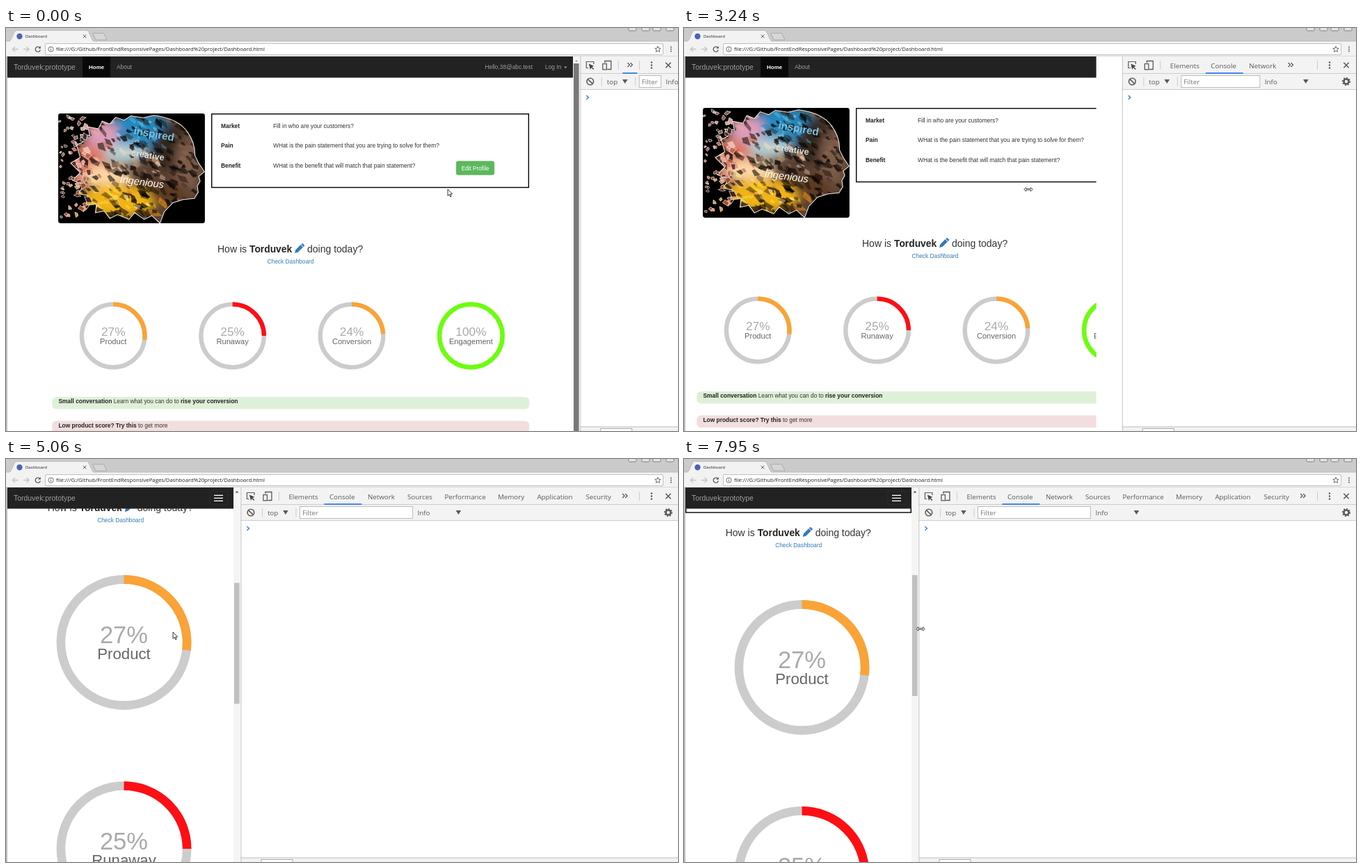
Recreate the animation shown at these times as an HTML page. Size 966 px wide and 580 px high, loop 8 s.

```html
<!DOCTYPE html>
<html lang="en">
<head>
<meta charset="utf-8">
<title>Responsive dashboard</title>
<style>
  html, body { margin: 0; width: 100%; height: 100%; overflow: hidden; background: #fff; }
  svg { display: block; }
  text { font-family: "Liberation Sans", Arial, sans-serif; font-size: 8.38px; fill: #333; white-space: pre; }
  .ui text { font-family: "Open Sans", "Noto Sans", sans-serif; font-size: 9.8px; fill: #5a5a5a; }
  .b { font-weight: 700; fill: #222; }
  .mid { text-anchor: middle; }
  .link { fill: #337ab7; }
  .line { fill: none; stroke: #5a5a5a; stroke-width: 1.3; }
  .sep { stroke: #ccc; }
</style>
</head>
<body>
<svg id="stage" width="966" height="580" viewBox="0 0 966 580"></svg>
<script>
const BRAND = 'Torduvek';
const LOOP = 8000;

// ---------- markup helpers ----------
const text = (x, y, s, attrs = '') => `<text x="${x}" y="${y}" ${attrs}>${s}</text>`;
const bold = (x, y, s) => text(x, y, s, 'class="b"');
const size = px => `style="font-size:${px}px"`;
const rect = (x, y, w, h, fill, attrs = '') =>
  `<rect x="${x}" y="${y}" width="${w}" height="${h}" fill="${fill}" ${attrs}/>`;
const path = (d, attrs) => `<path d="${d}" ${attrs}/>`;
const group = (x, y, body, attrs = '') => `<g transform="translate(${x} ${y})" ${attrs}>${body}</g>`;
const down = (x, y) => path(`M${x - 3.8} ${y - 3}h7.6l-3.8 6z`, 'fill="#5a5a5a"');
const dots = (x, y, r, gap) =>
  [-gap, 0, gap].map(d => `<circle cx="${x}" cy="${y + d}" r="${r}" fill="#555"/>`).join('');

// ---------- picture: a dissolving head in flat tones ----------
let seed = 11;
const rnd = () => (seed = (seed * 16807) % 2147483647) / 2147483647;
const pick = list => list[Math.floor(rnd() * list.length)];

// an irregular four-cornered splinter, stretched along its tilt
function shard(x, y, r, stretch, tilt, attrs) {
  const turn = rnd() * 6.28;
  const pts = [0, 1.3, 2.9, 4.4].map(d => {
    const k = r * (0.6 + rnd() * 0.8), a = turn + d;
    return `${(k * stretch * Math.cos(a)).toFixed(1)},${(k * Math.sin(a)).toFixed(1)}`;
  });
  return `<polygon points="${pts.join(' ')}" transform="translate(${x.toFixed(1)} ${y.toFixed(1)}) rotate(${tilt.toFixed()})" ${attrs}/>`;
}

function picture() {
  const head = 'M38 66L52 60 46 44 66 46 62 28 84 32 92 16 108 22 120 8 138 14 152 5 178 9 200 4Q250 10 270 38 287 62 286 88' +
    'L294 104 306 122 294 132 297 142 291 152 293 165 285 178 262 180 240 187 222 206 213 230' +
    ' 196 214 180 222 160 208 148 222 124 212 108 220 96 204 78 208 80 190 58 192 62 172 42 168 54 150 30 140 46 124 26 104 46 92Z';
  const glow = (x, y, rx, ry, c) => `<ellipse cx="${x}" cy="${y}" rx="${rx}" ry="${ry}" fill="${c}"/>`;
  let inside = '', loose = '';
  for (let i = 0; i < 330; i++) {
    const x = 30 + rnd() * 265, y = 5 + rnd() * 218;
    const light = y > 135 ? ['#ffd21e', '#ffe48a', '#e08a1c'] : x < 105 ? ['#f0a596', '#f6d4cc', '#d2604c'] : y < 80 ? ['#4fb3de', '#a9d8ea', '#2c7fae'] : ['#e8d9c4', '#c99c70', '#8c6a55'];
    const dark = rnd() < 0.4 + x / 600;
    const tone = dark ? pick(['#000', '#0d0907', '#2a1710']) : pick(x > 225 ? ['#8a6450', '#5d4436', '#3a2a24'] : light);
    inside += shard(x, y, 2.5 + rnd() * 4.5, 2, 35 + rnd() * 40 - 20, `fill="${tone}" opacity="${(0.35 + rnd() * 0.45).toFixed(2)}"`);
  }
  for (let i = 0; i < 62; i++) {
    const x = 3 + rnd() * 62, y = 6 + rnd() * 218;
    const tone = pick(y < 70 ? ['#8d5a4c', '#d3a3a4', '#3a2620'] : y < 150 ? ['#c9634c', '#e0a090', '#7b3427'] : ['#a5482c', '#d89a3c', '#452016']);
    loose += shard(x, y, 2 + x / 65 * 4, 1.3, rnd() * 180, `fill="${tone}" stroke="#f4e6df" stroke-width="1"`);
  }
  const word = (x, y, turn, px, fill, s, extra = '') =>
    `<text transform="translate(${x} ${y}) rotate(${turn})" style="font-size:${px}px;fill:${fill};${extra}">${s}</text>`;
  return `<clipPath id="headClip">${path(head, '')}</clipPath>
    <filter id="soft" x="-40%" y="-40%" width="180%" height="180%"><feGaussianBlur stdDeviation="10"/></filter>
    <clipPath id="frame"><rect width="307" height="230" rx="5"/></clipPath>
    <symbol id="art" viewBox="0 0 307 230"><g clip-path="url(#frame)">
      ${rect(0, 0, 307, 230, '#000')}
      <g clip-path="url(#headClip)">${rect(0, 0, 307, 230, '#5a4032')}
        <g filter="url(#soft)">
          ${glow(170, 38, 72, 40, '#2389c0')}${glow(92, 46, 36, 30, '#dd9dbb')}
          ${glow(62, 108, 44, 44, '#dc7a66')}${glow(140, 84, 44, 22, '#b4cdd2')}
          ${glow(100, 130, 52, 22, '#fbd8a6')}${glow(125, 182, 80, 36, '#f0b414')}
          ${glow(235, 70, 38, 48, '#33261f')}${glow(270, 110, 26, 60, '#7d5c4a')}${glow(230, 165, 42, 24, '#5b3a20')}
        </g>${inside}</g>
      ${path(head, 'fill="none" stroke="#f6ece4" stroke-width="1.5"')}${loose}
      ${word(157, 43, 10, 22, '#79c2e2', 'inspired', 'font-weight:700')}
      ${word(152, 88, 9, 18.5, '#d6dedf', 'creative', 'font-weight:700')}
      ${word(129, 145, 7, 21.5, '#fff', 'ingenious', 'font-style:italic')}
      ${word(72, 190, -2, 9, '#ffe066', 'powerful')}
    </g></symbol>`;
}
const art = (x, y, w, h) => `<use href="#art" x="${x}" y="${y}" width="${w}" height="${h}"/>`;

// ---------- page pieces ----------
const METERS = [['Product', 27, '#faa336'], ['Runaway', 25, '#ff0e14'], ['Conversion', 24, '#faa336'], ['Engagement', 100, '#6bff0b']];
const PROFILE = [
  ['Market', 'Fill in who are your customers?'],
  ['Pain', 'WHat is the pain statement that you are trying to solve for them?'],
  ['Benefit', 'WHat is the benefit that will match that pain statement?']
];

function meter([label, pct, color], x, y, scale) {
  const ring = (c, more = '') => `<circle r="45.3" fill="none" stroke="${c}" stroke-width="6.3" ${more}/>`;
  return `<g transform="translate(${x} ${y}) scale(${scale})">${ring('#ccc')}
    ${ring(color, `pathLength="100" stroke-dasharray="${pct} ${pct < 100 ? 100 : 0}" transform="rotate(-90)"`)}
    ${text(0, 0.4, pct + '%', 'class="mid" style="font-size:17.3px;fill:#aaa"')}
    ${text(0, 12.2, label, 'class="mid" style="font-size:11.1px;fill:#666"')}</g>`;
}

const button = (x, y) => rect(x + .3, y + .3, 54.5, 19.5, '#5cb85c', 'rx="2.5" stroke="#4cae4c" stroke-width=".6"') +
  text(x + 27.5, y + 13, 'Edit Profile', 'class="mid" style="font-size:8.2px;fill:#fff"');

const heading = text(304, 323, 'How is', size(14)) +
  text(350, 323, BRAND, `class="b" ${size(13.8)}`) +
  group(415, 310, path('M0 14l1.2-4.6 7.3-7.3 3.4 3.4-7.3 7.3zM9.3 1.5l1.2-1.2q.6-.5 1.2 0l2.2 2.2q.5.6 0 1.2l-1.2 1.2z', 'class="link"')) +
  text(433, 323, 'doing today?', size(14)) +
  text(409, 339, 'Check Dashboard', 'class="mid link"');

const banner = (x, y, w, fill, body) => rect(x, y, w, 17.5, fill, 'rx="6"') + text(x + 9.2, y + 9, body);
const strong = s => `<tspan class="b">${s}</tspan>`;
const banners = (x, y, w) =>
  banner(x, y, w, '#dff0d8', `${strong('Small conversation')} Learn what you can do to ${strong('rise your conversion')}`) +
  banner(x, y + 34.5, w, '#f2dede', `${strong('Low product score? Try this')} to get more`);

const desktop = art(75, 123, 211, 158) +
  rect(295.7, 123.7, 455.6, 105.8, 'none', 'stroke="#000" stroke-width="1.4"') +
  PROFILE.map(([k, v], i) => bold(309, 143.5 + i * 28.5, k) + text(384, 143.5 + i * 28.5, v)).join('') +
  button(647, 191.5) + heading +
  METERS.map((m, i) => meter(m, 154.2 + i * 171.4, 443, 1)).join('') +
  banners(66.3, 531, 686);

const mobile = art(11, 75, 307, 230) +
  PROFILE.map(([k, v], i) => bold(10, 322 + i * 37, k) + text(10, 334 + i * 37, v)).join('') +
  button(10, 416.5) + group(-244.3, 159, heading) +
  METERS.map((m, i) => meter(m, 169.5, 671 + i * 297, 2)).join('') +
  banners(3, 1719, 323);

const nav = rect(2, 41, 964, 30.5, '#222') +
  text(11, 60, BRAND + ':prototype', 'style="font-size:10.45px;fill:#9d9d9d"') +
  `<g id="wideNav">${rect(110, 41, 40, 30, '#080808')}
    ${text(119, 59, 'Home', 'style="font-size:8px;font-weight:700;fill:#fff"')}
    ${text(159, 59, 'About', 'style="fill:#9d9d9d"')}
    <g id="account">${text(757, 59, 'Hello,38@abc.test', 'text-anchor="end" style="fill:#9d9d9d"')}
    ${text(775, 59, 'Log In', 'style="fill:#9d9d9d"')}${path('M802 55.5h4.6l-2.3 2.4z', 'fill="#9d9d9d"')}</g></g>` +
  `<g id="burger">${rect(-34, 46.5, 26, 19.5, 'none', 'rx="2.5" stroke="#2d2d2d"')}
    ${[52, 56, 60].map(y => rect(-28, y - .3, 13, 1.3, '#fff')).join('')}</g>`;

// ---------- browser frame ----------
const winButtons = [895, 914, 930, 949].map(x => rect(x, -4, 11, 8, '#e4e4e4', 'rx="1.5" stroke="#777" stroke-width=".9"')).join('');
const chrome = `<g class="ui">${rect(0, 0, 966, 41, '#cbcbcb')}${winButtons}
  ${path('M124.5 7.5h16l4.5 9.5h-16z', 'fill="#d6d6d6" stroke="#a2a2a2" stroke-width=".8"')}
  ${rect(0, 19, 966, 22, '#f2f2f2')}
  ${path('M0 19H5Q7 18 8 15L12 6Q13 3.5 15 3.5H116Q118 3.5 119 6L123 15Q124 18 126 19H966', 'fill="#f2f2f2" stroke="#b0b0b0" stroke-width=".7"')}
  ${rect(6, 19, 119, 1, '#f2f2f2')}
  <circle cx="19.5" cy="12" r="4.2" fill="#4a63b8"/>
  ${text(28, 13.8, 'Dashboard', 'style="font-size:6px;fill:#222"')}
  ${path('M110.8 9.6l4.6 4.6m0-4.6l-4.6 4.6', 'class="line" style="stroke-width:1"')}
  ${path('M17.5 30.5h-8m3.5-3.5l-3.6 3.5 3.6 3.5M25 30.5h8m-3.5-3.5l3.6 3.5-3.6 3.5', 'class="line" style="stroke:#c4c4c4"')}
  ${path('M48.6 28.2A3.6 3.6 0 1 0 49.3 31.5', 'class="line"')}${path('M49.8 26v3.6h-3.6z', 'fill="#555"')}
  ${rect(56.5, 22.5, 888, 16, '#fff', 'rx="1.5" stroke="#b9b9b9" stroke-width=".9"')}
  <circle cx="64.5" cy="30.5" r="3.6" class="line" style="stroke-width:.9"/>${path('M64.5 29.8v2.8m0-4.4v1', 'class="line" style="stroke-width:.9"')}
  ${text(72, 33.2, 'file:///G:/Github/FrontEndResponsivePages/Dashboard%20project/Dashboard.html', 'style="font-size:7.78px;fill:#222"')}
  ${path('M937 26.3l1.2 2.8 3 .2-2.3 2 .8 3-2.7-1.6-2.7 1.6.8-3-2.3-2 3-.2z', 'class="line" style="stroke-width:.9"')}
  ${dots(956, 30.5, .9, 3)}${rect(0, 40.3, 966, .7, '#cfcfcf')}</g>`;

// ---------- developer tools ----------
const TABS = [['Elements', 69, 112], ['Console', 127.5, 166], ['Network', 182.5, 223], ['Sources', 239.5, 276], ['Performance', 293, 353],
  ['Memory', 369.5, 409], ['Application', 426, 479], ['Security', 496, 533]];
const tools = `<g class="ui">
  <g id="tools">${rect(0, 41, 966, 539, '#f3f3f3')}${rect(0, 89, 966, 485, '#fff')}
    ${rect(0, 65, 966, 1, '#ccc')}${rect(0, 88, 966, 1, '#ccc')}${rect(0, 573.5, 966, 1, '#bbb')}
    ${rect(29.5, 576.5, 45, 8, '#fff', 'stroke="#aaa"')}
    ${path('M12 57.5H9V48.5h10.5v3.5', 'class="line" style="stroke-width:1.2"')}${path('M12.5 51.5l7.5 3.2-3 1.2 3 3-1 1-3-3-1.4 3z', 'fill="#444"')}
    ${path('M35.5 50V47.5H44.5V59.5H39', 'class="line"')}${rect(32.5, 51.5, 5.5, 8.3, '#f3f3f3', 'class="line"')}
    ${path('M55 47v13M31 70.5v13M79.5 70.5v13', 'class="sep"')}
    <circle cx="14.5" cy="77" r="4.8" class="line" style="stroke-width:1.6"/>${path('M11 73.6l7 6.8', 'class="line" style="stroke-width:1.6"')}
    ${text(38.5, 80.8, 'top')}${down(64.5, 77)}
    <rect id="filter" x="85" y="68.5" height="17" fill="#fff" stroke="#bbb"/>
    ${text(88.5, 80.8, 'Filter', 'style="fill:#777"')}
    <g id="level">${text(7, 80.8, 'Info')}${down(66, 77)}</g>
    ${path('M9 97l3 2.9-3 2.9', 'fill="none" stroke="#367cf1" stroke-width="1.4"')}
    ${TABS.map(([s, x]) => text(x, 57.5, s, 'data-tab')).join('')}
    <rect id="underline" y="64" height="2" fill="#4285f4"/>
    ${path('M-3.8 50l3 3-3 3m4-6l3 3-3 3', 'id="more" class="line"')}
    ${rect(0, 41, 1, 539, '#c4c4c4')}</g>
  ${path('M910.5 47v13', 'class="sep"')}${dots(928, 53.5, 1.2, 4)}
  ${path('M948.3 49.8l7.4 7.4m0-7.4l-7.4 7.4', 'class="line" style="stroke-width:1.6"')}
  <g id="gear" class="line"><circle cx="952" cy="77" r="3.5" style="stroke-width:2.6"/>
    <circle cx="952" cy="77" r="5.2" style="stroke-width:1.8" pathLength="16" stroke-dasharray="1 1"/></g></g>`;

const cursors = `<g id="cursor" stroke="#222" fill="#fff" stroke-width=".9">
  ${path('M0 0V9.5L2.2 7.5 3.7 11 5.2 10.3 3.7 7H6.6Z', 'id="arrow"')}
  ${path('M-6.3 0l3-2.7v1.9H3.3V-2.7L6.3 0 3.3 2.7V.8H-3.3V2.7Z', 'id="resize" stroke-width=".8"')}</g>`;

document.getElementById('stage').innerHTML = `<defs>${picture()}
  <clipPath id="pageClip"><rect id="clipBox" x="2" y="41" height="539"/></clipPath></defs>
  ${rect(0, 0, 966, 580, '#fff')}
  <g clip-path="url(#pageClip)"><g id="desktop">${desktop}</g>
    <g id="mobile"><rect id="box" x="2.7" y="305.7" height="142.3" fill="none" stroke="#000" stroke-width="1.4"/><g id="column">${mobile}</g></g>
    ${nav}
    <g id="tip">${rect(-57, 41.5, 60, 14.5, '#eee', 'opacity=".88"')}
      <text id="tipText" x="-53" y="51.5" style="font:7.2px 'DejaVu Sans Mono',monospace"></text></g></g>
  <g id="bar">${rect(0, 41, 10.5, 539, '#f5f5f5')}${path('M2.7 48.5h4.6l-2.3-2.7z', 'id="up"')}<rect id="thumb" x="1" width="7.6"/></g>
  ${rect(0, 41, 2, 539, '#bcbcbc')}${tools}${chrome}${cursors}`;

// ---------- motion ----------
const STEPS = [0, 120, 260, 410, 550, 690, 830, 980, 1120, 1260, 1420, 1720, 1850, 1980, 2110,
  2400, 2560, 2700, 2850, 2980, 3110, 3240, 3440, 3570, 3730, 3890, 4050, 4210, 4370,
  4640, 4770, 4910, 5060, 5210, 5330, 5450, 5570, 5720, 5860, 6000, 6120, 6240,
  7110, 7250, 7390, 7530, 7670, 7810, 7950];
const POINTER = [[0, 635, 232], [120, 628, 236], [260, 600, 244], [410, 596, 246], [690, 680, 252], [1120, 822, 258],
  [1260, 824, 258], [1420, 821, 259], [1720, 827, 263], [2110, 826.5, 262.8], [2400, 822, 263], [3240, 495, 232.3],
  [3440, 470, 234], [4210, 338, 250], [4370, 240, 249], [7530, 240, 249], [7810, 318, 246], [7950, 340, 244.5]];
const DIVIDER = [[2110, 825.3], [2400, 815], [3240, 629.8], [3440, 565], [3890, 440], [4210, 337.4]];
const EDGE = [[2110, 815], [2400, 804], [3240, 592.6], [3440, 540], [3890, 428], [4210, 327]];
const LAYOUT = [[2700, 815], [3240, 719]];
const SCROLL = [[4370, 0], [4640, 40], [5060, 407], [5210, 470], [5570, 760], [6000, 959], [6240, 1120], [7110, 1060], [7810, 371]];

function at(keys, t, col = 1) {
  const i = keys.findIndex(k => k[0] > t);
  if (i === 0) return keys[0][col];
  if (i < 0) return keys[keys.length - 1][col];
  const a = keys[i - 1], b = keys[i];
  return a[col] + (b[col] - a[col]) * (t - a[0]) / (b[0] - a[0]);
}

const $ = id => document.getElementById(id);
const set = (id, name, value) => $(id).setAttribute(name, value);
const move = (id, x, y = 0) => set(id, 'transform', `translate(${x} ${y})`);
const show = (id, on) => set(id, 'visibility', on ? 'visible' : 'hidden');
const tabs = [...document.querySelectorAll('[data-tab]')];

function drawTools(left) {
  const width = 966 - left;
  move('tools', left);
  const field = Math.min(162, 31 + (width - 140) * 0.418);
  set('filter', 'width', field);
  move('level', 85 + field);
  show('gear', width > 200);
  const count = TABS.filter(tab => left + tab[2] <= 875).length;
  tabs.forEach((el, i) => el.setAttribute('visibility', i < count ? 'visible' : 'hidden'));
  const more = count ? TABS[count - 1][2] + 19.5 : 72;
  move('more', more);
  set('underline', 'x', count > 1 ? 120 : more - 11);
  set('underline', 'width', count > 1 ? 54 : 21);
}

function draw(t) {
  const edge = at(EDGE, t), left = at(DIVIDER, t), scroll = at(SCROLL, t);
  const narrow = t >= 3890, shift = Math.round((at(LAYOUT, t) - 815) / 2);
  set('clipBox', 'width', edge - 2);
  show('desktop', !narrow);
  show('wideNav', !narrow);
  show('mobile', narrow);
  show('burger', narrow);
  move('desktop', shift, Math.round(shift / 6));
  move('account', shift * 2);
  move('mobile', 0, -scroll);
  move('column', (edge - 327) / 2);
  set('box', 'width', edge - 3.4);
  move('burger', edge);

  show('tip', t >= 3570 && t < 4640);
  move('tip', edge);
  $('tipText').textContent = `${Math.round((left - 4) / 0.585)}px x 950px`;

  show('bar', t < 2400 || t >= 4210);
  move('bar', edge);
  set('up', 'fill', scroll ? '#505050' : '#a3a3a3');
  set('thumb', 'y', 51 + scroll * 0.3128);
  set('thumb', 'height', narrow ? 174 : 529);
  set('thumb', 'fill', t < 120 ? '#787878' : t >= 980 && t < 1850 ? '#a8a8a8' : '#c1c1c1');

  drawTools(left);

  const resizing = (t >= 1720 && t < 4370) || t >= 7950;
  move('cursor', at(POINTER, t), at(POINTER, t, 2));
  show('arrow', !resizing);
  show('resize', resizing);
}

let last = -1;
function tick() {
  const now = performance.now() % LOOP;
  const step = STEPS.filter(s => s <= now).pop();
  if (step !== last) draw(last = step);
  requestAnimationFrame(tick);
}
tick();
</script>
</body>
</html>
```
